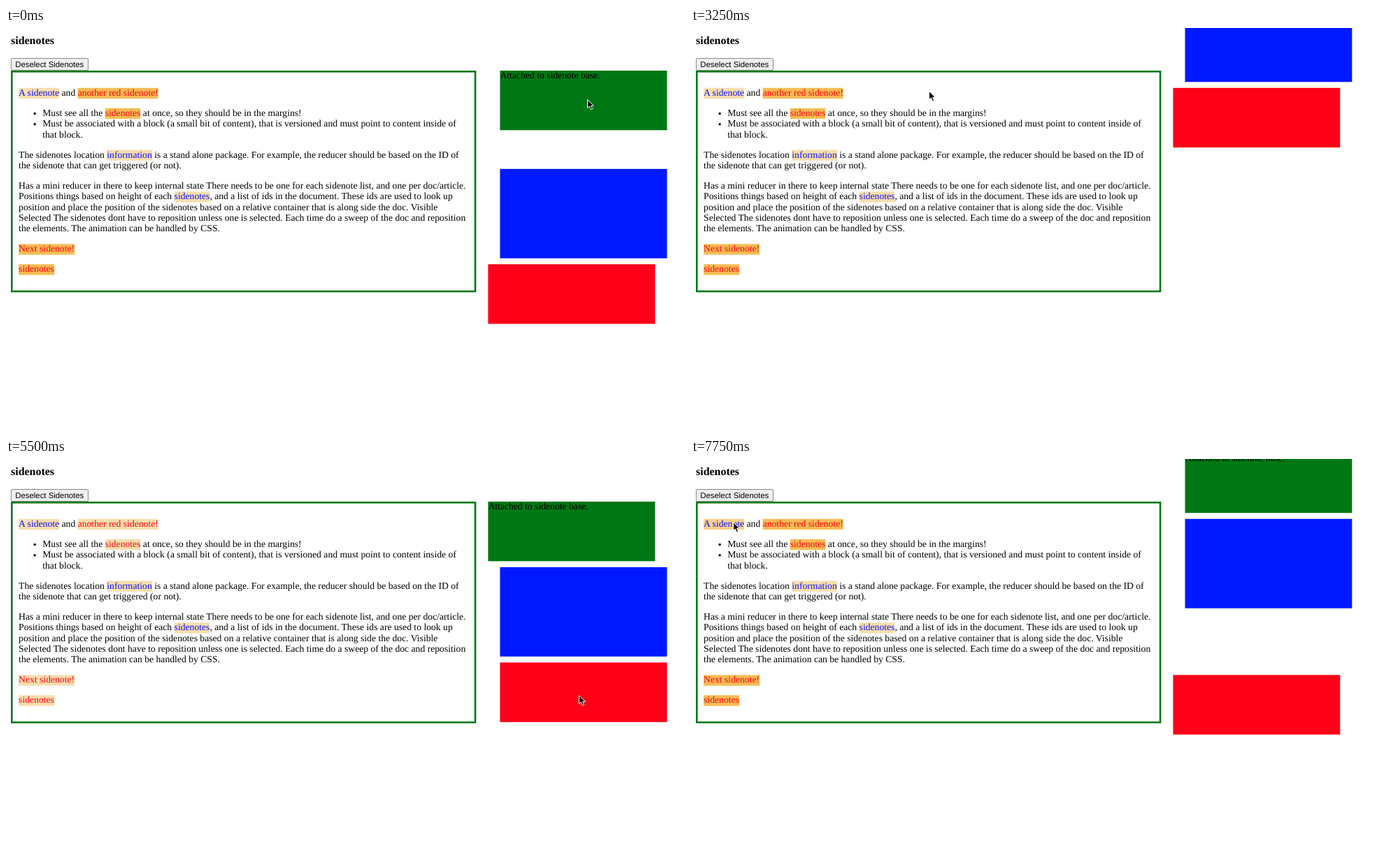
Write an HTML page that moves like this. It is 971 by 577 pixels and loops after 8000 ms.

```html
<!DOCTYPE html>
<html lang="en">
<head>
<meta charset="utf-8">
<title>sidenotes</title>
<style>
html, body { margin: 0; width: 100%; height: 100%; overflow: hidden; background: #fff; }
body { position: relative; }
#page {
  position: absolute; left: 7.3px; top: 8.8px; width: 1120px;
  transform: scale(.853); transform-origin: 0 0;
  font: 16px/18px "Liberation Serif", Times, serif;
  color: #000; white-space: nowrap; text-rendering: geometricPrecision;
}
h3 { margin: 0 0 18.72px; font-size: 18.72px; line-height: 21px; }
button {
  display: block; box-sizing: border-box; width: 129.5px; height: 21px; margin: 0; padding: 0;
  font: 13.333px "Liberation Sans", Arial, sans-serif; color: #000;
  background: #efefef; border: 1px solid #767676; border-radius: 2px;
  text-rendering: geometricPrecision;
}
article { box-sizing: border-box; width: 780px; padding: 10px; border: 3px solid #007715; }
p, ul { margin: 16px 0; }
ul { padding-left: 40px; }
.tag { display: inline-block; background: #f8deae; }
.tag.hover { background: #f9d08b; }
.tag.on { background: #f7bc55; }
.blue { color: #0a10f8; }
.red { color: #ff0014; }
.note { position: absolute; left: 0; top: 61.3px; width: 280px; }
#cursor { position: absolute; left: 0; top: 0; overflow: visible; pointer-events: none; }
</style>
</head>
<body>
<div id="page">
  <h3>sidenotes</h3>
  <button>Deselect Sidenotes</button>
  <article>
    <p><span class="tag blue">A sidenote</span> and <span class="tag red">another red sidenote!</span></p>
    <ul>
      <li>Must see all the <span class="tag red">sidenotes</span> at once, so they should be in the margins!</li>
      <li>Must be associated with a block (a small bit of content), that is versioned and must point to content inside of<br>that block.</li>
    </ul>
    <p>The sidenotes location <span class="tag blue">information</span> is a stand alone package. For example, the reducer should be based on the ID of<br>the sidenote that can get triggered (or not).</p>
    <p>Has a mini reducer in there to keep internal state There needs to be one for each sidenote list, and one per doc/article.<br>Positions things based on height of each <span class="tag blue">sidenotes</span>, and a list of ids in the document. These ids are used to look up<br>position and place the position of the sidenotes based on a relative container that is along side the doc. Visible<br>Selected The sidenotes dont have to reposition unless one is selected. Each time do a sweep of the doc and reposition<br>the elements. The animation can be handled by CSS.</p>
    <p><span class="tag red">Next sidenote!</span></p>
    <p><span class="tag red">sidenotes</span></p>
  </article>
  <div class="note" style="height:100px;background:#007715">Attached to sidenote base.</div>
  <div class="note" style="height:150px;background:#0018ff"></div>
  <div class="note" style="height:100px;background:#ff0018"></div>
</div>
<svg id="cursor" width="12" height="18">
  <path d="M.5 .5V12.6L3.3 10 5.4 14.8 7.6 13.9 5.5 9.2H9.3Z" fill="#000" stroke="#fff" stroke-width="1" stroke-linejoin="round"/>
</svg>
<script>
const LOOP = 8000, TICK = 250, SLIDE = 300, GAP = 10;
const GREEN = 0, BLUE = 1, RED = 2;
const heights = [100, 150, 100];
const colors = ['', 'blue', 'red'];

// Each click selects a note and moves it to the anchor of the clicked text.
const clicks = [
  [-SLIDE, RED, 325], [1739, BLUE, 29], [2900, RED, 29], [3894, BLUE, 29],
  [4690, GREEN, 0], [5600, RED, 29], [6709, RED, 291]
];

// Pointer: time, x, y; it holds between entries.
const path = [
  [0, 831, 102], [250, 298, 314], [1000, 215, 245], [1250, 110, 150], [1500, 54, 98],
  [1750, 51, 98], [2250, 90, 103], [2500, 148, 104], [2750, 163, 101], [3250, 340, 90],
  [3500, 600, 64], [3750, 768, 53], [4000, 778, 51], [5000, 788, 140], [5250, 812, 290],
  [5500, 819, 338], [6000, 640, 332], [6250, 250, 326], [6500, 45, 322], [6750, 54, 318],
  [7250, 40, 220], [7500, 12, 110], [7750, 60, 90]
];

function ease(x) {
  if (x >= 1) return 1;
  let lo = 0, hi = 1, s;
  for (let i = 0; i < 24; i++) {
    s = (lo + hi) / 2;
    if (.75 * s * (1 - s) + s ** 3 < x) lo = s; else hi = s;
  }
  return .3 * (1 - s) ** 2 * s + 3 * (1 - s) * s * s + s ** 3;
}

// The selected note sits on its anchor; its neighbours are pushed clear of it.
function layout(anchors, sel) {
  const y = anchors.slice();
  for (let i = sel - 1; i >= 0; i--) y[i] = Math.min(y[i], y[i + 1] - heights[i] - GAP);
  for (let i = sel + 1; i < y.length; i++) y[i] = Math.max(y[i], y[i - 1] + heights[i - 1] + GAP);
  return y.map((v, i) => ({ x: i === sel ? 800 : 820, y: v }));
}

const anchors = [0, 203, 325];
const states = clicks.map(([time, sel, anchor]) => {
  anchors[sel] = anchor;
  return { time, sel, spots: layout(anchors, sel) };
});

const notes = [...document.querySelectorAll('.note')];
const tags = [...document.querySelectorAll('.tag')];
const cursor = document.getElementById('cursor');
const mix = (a, b, k) => a + (b - a) * k;

function draw(t) {
  const n = states.filter(s => s.time <= t).length - 1;
  const now = states[n], old = states[Math.max(0, n - 1)];
  const k = ease((t - now.time) / SLIDE);
  notes.forEach((el, i) => {
    const a = old.spots[i], b = now.spots[i];
    el.style.transform = `translate(${mix(a.x, b.x, k)}px, ${mix(a.y, b.y, k)}px)`;
  });

  const [, x, y] = path.filter(p => p[0] <= t).pop();
  cursor.style.transform = `translate(${x}px, ${y}px)`;
  const under = document.elementFromPoint(x, y - 1);
  for (const tag of tags) {
    tag.classList.toggle('on', tag.classList.contains(colors[now.sel] || 'none'));
    tag.classList.toggle('hover', tag === under);
  }
}

let shown = -1;
function loop() {
  const t = Math.floor(performance.now() % LOOP / TICK) * TICK;
  if (t !== shown) draw(shown = t);
  requestAnimationFrame(loop);
}
loop();
</script>
</body>
</html>
```
